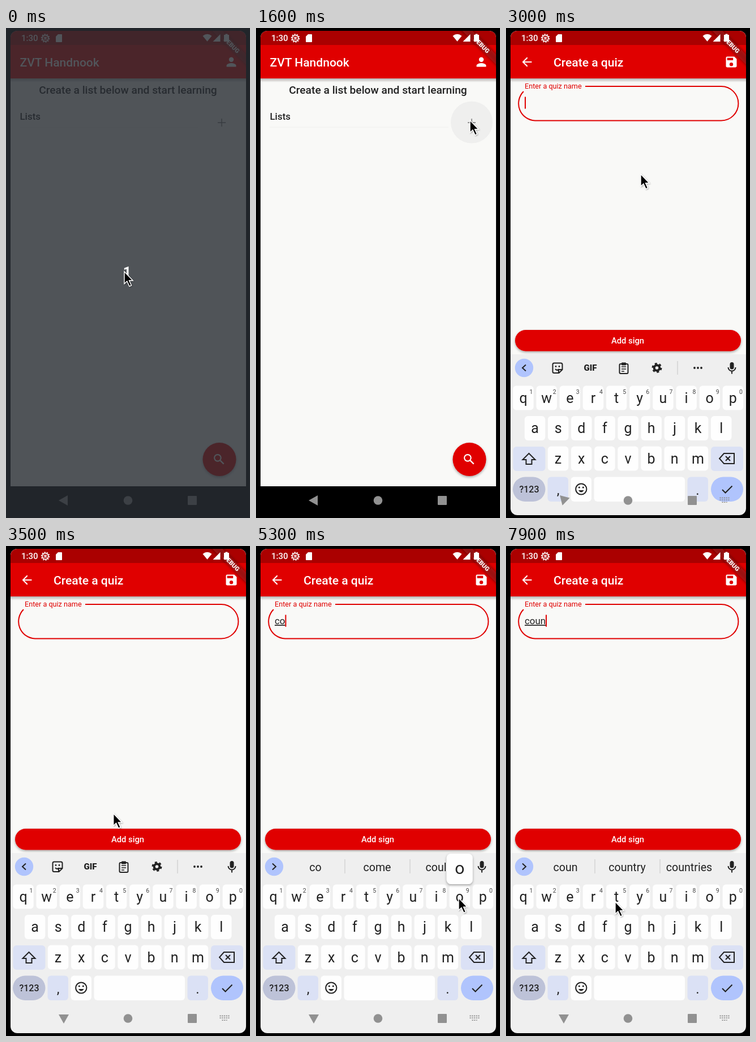
An HTML page that plays this animation: 431 by 865 pixels, repeating every 8000 ms.

```html
<!DOCTYPE html>
<html lang="en">
<head>
<meta charset="utf-8">
<title>Creating a quiz list</title>
<style>
  html, body { margin: 0; width: 100%; height: 100%; overflow: hidden; background: #000; }
  svg { display: block; width: 100vw; height: 100vh; font-family: Roboto, sans-serif; }
  .line { fill: none; stroke: #222; stroke-width: 2; }
  .mid { text-anchor: middle; }
</style>
</head>
<body>
<svg id="stage" viewBox="0 0 431 865"></svg>
<script>
const LOOP = 8000, STEP = 100, RED = '#e00000', GREY = '#919191', INK = '#212121';
const BLUE = '#b0c4fd', PALE = '#dbe1f5';

// ---------- drawing helpers ----------
const text = (x, y, size, content, attrs = '') =>
  `<text x="${x}" y="${y}" font-size="${size}" ${attrs}>${content}</text>`;
const box = (x, y, w, h, r, fill, attrs = '') =>
  `<rect x="${x}" y="${y}" width="${w}" height="${h}" rx="${r}" fill="${fill}" ${attrs}/>`;
const dot = (x, y, r, attrs = '') => `<circle cx="${x}" cy="${y}" r="${r}" ${attrs}/>`;
const path = (d, attrs = '') => `<path d="${d}" ${attrs}/>`;
const icon = (x, y, body) =>
  `<g transform="translate(${x} ${y}) scale(1.053) translate(-12 -12)" fill="#fff">${body}</g>`;

const personIcon = dot(12, 8, 4) + path('M12 14c-2.67 0-8 1.34-8 4v2h16v-2c0-2.66-5.33-4-8-4z');
const backIcon = path('M20 12H5.5M12.7 4.7L5.4 12l7.3 7.3', 'fill="none" stroke="#fff" stroke-width="2"');
const searchIcon = dot(9.5, 9.5, 5.5, 'fill="none" stroke="#fff" stroke-width="2"') +
  path('M14 14l5.7 5.7', 'stroke="#fff" stroke-width="2.2"');
const saveIcon = path('M17 3H5a2 2 0 0 0-2 2v14a2 2 0 0 0 2 2h14a2 2 0 0 0 2-2V7z') +
  `<g fill="${RED}">${dot(12, 16, 3)}${box(5, 5, 10, 4, 0, RED)}</g>`;

const page = (id, title, titleX, content) => `<g id="${id}">
  ${box(8, 5, 416, 804, 0, '#f9f9f7')}
  ${box(8, 89, 416, 7, 0, 'url(#barShadow)')}
  ${box(8, 5, 416, 25.5, 0, '#aa0000')}${box(8, 30, 416, 59, 0, RED)}
  ${text(titleX, 68, 21.06, title, 'fill="#fff" font-weight="500"')}${content}</g>`;

// ---------- screens ----------
const listPage = page('listPage', 'ZVT Handnook', 24.5,
  icon(398, 60, personIcon) +
  text(215.5, 116, 19.2, 'Create a list below and start learning', `class="mid" font-weight="500" fill="${INK}"`) +
  text(24.5, 162, 16.85, 'Lists', `font-weight="500" fill="${INK}"`) +
  box(24, 174.5, 316, 1, 0, '#f0f0ee') +
  dot(381, 166.5, 37, 'id="ripple" fill="#efefee"') +
  path('M374 167h14M381 160v14', 'stroke="#777" stroke-width="1.4"') +
  dot(377, 761.5, 29.5, `fill="${RED}" filter="url(#shadow)"`) + icon(376.5, 761.5, searchIcon));

const quizPage = page('quizPage', 'Create a quiz', 84,
  icon(37, 60, backIcon) + icon(398, 60, saveIcon) +
  box(21, 103, 389, 60.5, 30.2, 'none', 'id="idleField" stroke="#9b9b9a"') +
  path('M140 103H380.2a30.2 30.2 0 0 1 0 60.5H51.2A30.2 30.2 0 0 1 31 112',
    `id="activeField" fill="none" stroke="${RED}" stroke-width="2"`) +
  text(33, 107, 12.64, 'Enter a quiz name', 'id="label"') +
  text(33, 138, 16.85, '', `id="entry" fill="${INK}" text-decoration="underline"`) +
  box(0, 121.5, 2, 21, 0, RED, 'id="caret"') +
  `<g id="addButton">${box(16, 499, 399, 37.5, 18.7, RED, 'filter="url(#shadow)"')}
   ${text(215, 523, 14.74, 'Add sign', 'class="mid" fill="#fff" font-weight="500"')}</g>`);

// ---------- keyboard ----------
const keyCentres = {};
function keyRow(letters, firstX, y) {
  return [...letters].map((letter, i) => {
    const x = firstX + i * 41.15;
    keyCentres[letter] = [x, y];
    const digit = letters.length === 10 ? text(x + 14, y - 7.5, 10.5, (i + 1) % 10, 'class="mid" fill="#444"') : '';
    return box(x - 18.2, y - 21.5, 36.5, 43, 6, '#fefefe') + text(x, y + 8.5, 25, letter, 'class="mid"') + digit;
  }).join('');
}

const tools = `<g id="tools">
  <g class="line">${path('M85 557.5h12a2.500 2.500 0 0 1 2.500 2.500v9l-6 6h-8.500a2.500 2.500 0 0 1-2.500-2.500v-12.500a2.500 2.500 0 0 1 2.500-2.500zM93 575v-6h6M87 568q4 4 6 0')}
  ${box(200.500, 559, 15, 17, 2, 'none')}${path('M204 568h8M204 572h5M204 564h8', 'stroke-width="1.6"')}</g>
  ${box(204, 556.5, 8, 5, 1, '#222')}${dot(88, 563.5, 1.4)}${dot(94, 563.5, 1.4)}
  ${text(149, 571, 15, 'GIF', 'class="mid" font-weight="900"')}
  ${dot(266.500, 566, 4.8, 'class="line" style="stroke-width:4"')}
  ${dot(266.500, 566, 7.5, 'class="line" style="stroke-width:3" stroke-dasharray="3.93"')}
  ${box(302.5, 554, 1, 24, 0, '#c4c4c4')}
  ${[333, 339, 345].map(x => dot(x, 566, 1.9)).join('')}</g>`;

const suggestions = `<g id="suggestions">
  ${[105, 214, 323.5].map(x => text(x, 574, 19.6, '', 'class="mid word"')).join('')}
  ${box(156.5, 553, 1, 25, 0, '#c8c8c8')}${box(271.5, 553, 1, 25, 0, '#c8c8c8')}</g>`;

const micIcon = box(395.5, 556, 7, 12.5, 3.5, '#222') +
  path('M392.5 565a6.5 6.5 0 0 0 13 0M399 571.500v5', 'class="line"');

const keyboard = `<g clip-path="url(#deviceClip)"><g id="keyboard" fill="${INK}">
  ${box(8, 542, 416, 400, 0, '#efefef')}
  ${dot(32, 566, 16.2, `fill="${BLUE}"`)}${path('M4 -5.5L-2 0L4 5.5', 'id="chevron" class="line"')}
  ${tools}${suggestions}${micIcon}
  ${keyRow('qwertyuiop', 30.5, 619)}${keyRow('asdfghjkl', 51, 672.5)}${keyRow('zxcvbnm', 92, 726)}
  ${box(12.500, 705, 57, 43, 6, PALE)}${path('M40.500 717l-11 11h6v8h10v-8h6z', 'class="line"')}
  ${box(362, 705, 57, 43, 6, PALE)}
  ${path('M385 717h18v18h-18l-8-9zM388 722l8 8M396 722l-8 8', 'class="line"')}
  ${box(12, 758.500, 57.500, 43.500, 21.7, '#bdc2d8')}${text(41, 786, 16, '?123', 'class="mid" font-weight="500"')}
  ${box(73.500, 758.500, 36.500, 43.500, 6, PALE)}${text(92, 790, 24, ',', 'class="mid"')}
  ${box(114.500, 758.500, 36.500, 43.500, 6, '#fefefe')}${dot(132.800, 780, 9.6, 'class="line"')}
  ${dot(129.300, 777, 1.6)}${dot(136.300, 777, 1.6)}${path('M127.800 782q5 7 10 0z')}
  ${box(155.500, 758.500, 160.500, 43.500, 6, '#fefefe')}
  ${box(320.500, 758.500, 36.500, 43.500, 6, PALE)}${text(338.500, 790, 24, '.', 'class="mid"')}
  ${box(362, 758.500, 57, 43.500, 21.7, BLUE)}${path('M382 781l5.500 5.500l12-12', 'class="line"')}
  <g id="popup">${box(-23, -76, 46, 54, 8, '#fefefe', 'filter="url(#shadow)"')}${text(0, -40, 30, '', 'class="mid" id="popupLetter"')}</g>
</g></g>`;

// ---------- device furniture ----------
const ribbon = `<g clip-path="url(#screenClip)"><g transform="translate(398.700 30.300) rotate(45)">
  ${box(-50, -6.3, 100, 12.6, 0, 'rgba(0,0,0,.5)', 'filter="url(#soft)"')}
  ${box(-50, -6.3, 100, 12.6, 0, 'rgba(183,28,28,.63)')}
  ${text(0, 3.9, 10.75, 'DEBUG', 'class="mid" fill="#fff" font-weight="900"')}</g></g>`;

const statusBar = `<g fill="#fff">
  ${text(27, 23, 15, '1:30', 'font-weight="500"')}
  ${dot(69.500, 18, 5.4, 'fill="none" stroke="#fff" stroke-width="1.6"')}
  ${dot(69.500, 18, 7, 'fill="none" stroke="#fff" stroke-width="1.6" stroke-dasharray="2.2"')}
  ${path('M66.500 16.500h6M66.500 19.500h6M69.500 16v4', 'stroke="#fff" stroke-width="1.3"')}
  ${path('M92 11h6a1 1 0 0 1 1 1v12a1 1 0 0 1-1 1h-9a1 1 0 0 1-1-1v-9z')}
  ${path('M347.500 14q8-6.500 16 0l-8 9.800z')}${path('M378.500 11v13h-13z')}
  ${path('M385 12h2.500v-1.500h4v1.500h2.500v12h-9z')}</g>`;

const navBar = `<g fill="${GREY}">
  ${path('M-9 0L7 -9V9z', 'id="navBack"')}${dot(215.500, 834, 7.800)}${box(321, 826, 16, 16, 1, GREY)}
  ${path('M377.500 829.500h17M377.500 833.200h17M381.500 837.200h9',
    `id="navKeys" stroke="${GREY}" stroke-width="1.800" stroke-dasharray="2.200 1.500"`)}</g>`;

const pointer = path('M0 0V21.500L4.800 17L9 26L12.500 24.400L8.500 15.800H15z',
  'id="pointer" fill="#000" stroke="#fff" stroke-width="1.400" filter="url(#soft2)"');

document.getElementById('stage').innerHTML = `<defs>
  <linearGradient id="barShadow" x2="0" y2="1"><stop stop-color="#000" stop-opacity=".28"/><stop offset="1" stop-opacity="0"/></linearGradient>
  <filter id="shadow" x="-30%" y="-30%" width="160%" height="170%"><feDropShadow dx="0" dy="2" stdDeviation="2" flood-opacity=".35"/></filter>
  <filter id="soft" x="-20%" y="-100%" width="140%" height="300%"><feGaussianBlur stdDeviation="2.500"/></filter>
  <filter id="soft2" x="-30%" y="-30%" width="170%" height="170%"><feDropShadow dx="1" dy="1" stdDeviation=".8" flood-opacity=".35"/></filter>
  <clipPath id="screenClip"><path d="M8 809V17a12 12 0 0 1 12-12H412a12 12 0 0 1 12 12V809z"/></clipPath>
  <clipPath id="deviceClip"><path d="M8 300H424V848a12 12 0 0 1-12 12H20a12 12 0 0 1-12-12z"/></clipPath>
  </defs>
  ${box(0, 0, 431, 865, 0, '#000')}
  <g clip-path="url(#screenClip)">${listPage}${quizPage}</g>
  ${ribbon}${keyboard}${statusBar}${navBar}
  <g id="countdown">${box(0, 0, 431, 865, 0, '#292e34', 'opacity=".81"')}
  ${text(214, 440, 25, '1', 'class="mid" fill="#fff" font-weight="700"')}</g>${pointer}`;

// ---------- motion ----------
const $ = id => document.getElementById(id);
const words = document.querySelectorAll('.word');
const clamp = v => Math.min(1, Math.max(0, v));
const smooth = v => v * v * (3 - 2 * v);
const progress = (t, from, to) => clamp((t - from) / (to - from));
const mix = (a, b, p) => a + (b - a) * p;
const show = (id, visible) => $(id).setAttribute('visibility', visible ? 'visible' : 'hidden');
const set = (id, attrs) => Object.entries(attrs).forEach(([name, value]) => $(id).setAttribute(name, value));

function along(keys, t, ease = smooth) {
  const next = keys.findIndex(key => key[0] > t);
  if (next === 0) return keys[0].slice(1);
  if (next < 0) return keys[keys.length - 1].slice(1);
  const [a, b] = [keys[next - 1], keys[next]];
  const p = ease(progress(t, a[0], b[0]));
  return a.slice(1).map((v, i) => mix(v, b[i + 1], p));
}

const pointerKeys = [
  [400, 209, 430], [1300, 378, 163], [2000, 378, 163], [2300, 299, 131], [2900, 299, 131],
  [3000, 238, 258], [3100, 206, 375], [3200, 191, 455], [3400, 190, 465], [4400, 181, 723],
  [4600, 181, 723], [5200, 358, 621], [5400, 358, 622], [5800, 272, 622], [6000, 272, 622],
  [6200, 263, 690], [6700, 291, 734], [6900, 291, 734], [7300, 193, 628]
];
const keyboardDrop = [[2800, 318], [2900, 150], [3000, 34], [3100, 7], [3200, 0]];
const backTurn = [[2700, 0], [2800, -27], [2900, -53], [3000, -75], [3200, -90]];
const typing = [
  { at: 2700, value: '', offers: [] },
  { at: 4600, value: 'c', offers: ['can', 'come'] },
  { at: 5300, value: 'co', offers: ['come', 'could'] },
  { at: 6000, value: 'cou', offers: ['country', 'countries'] },
  { at: 6900, value: 'coun', offers: ['country', 'countries'] }
];

function draw(t) {
  show('countdown', t < 100);
  show('ripple', t >= 1600);

  const enter = progress(t, 1600, 1900), scale = mix(.85, 1, 1 - (1 - enter) ** 3);
  set('quizPage', {
    opacity: clamp(enter * 1.6),
    transform: `translate(216 407) scale(${scale}) translate(-216 -407)`
  });

  const focus = smooth(progress(t, 2500, 2800));
  set('idleField', { opacity: focus ? 0 : 1 });
  set('activeField', { opacity: focus });
  set('label', { y: mix(138, 107, focus), 'font-size': mix(16.85, 12.64, focus), fill: focus ? RED : '#6f6f6e' });

  const [drop] = along(keyboardDrop, t);
  set('keyboard', { transform: `translate(0 ${drop})` });
  set('addButton', { transform: `translate(0 ${Math.min(265.5, drop)})` });
  set('navBack', { transform: `translate(102 834) rotate(${along(backTurn, t, p => p)[0]})` });
  show('navKeys', t >= 2700);

  const typed = typing.filter(event => event.at <= t).pop();
  const value = typed ? typed.value : '';
  $('entry').textContent = value;
  const blinkOn = typed && Math.floor((t - typed.at + 100) / 500) % 2 === 0;
  show('caret', blinkOn);
  set('caret', { x: 33 + (value ? $('entry').getComputedTextLength() : 0) });

  show('tools', !value);
  show('suggestions', value);
  if (value) [value, ...typed.offers].forEach((word, i) => { words[i].textContent = word; });
  set('chevron', { transform: `translate(${value ? 33 : 31} 566) scale(${value ? -1 : 1} 1)` });

  const pressed = value && t < typed.at + 100;
  show('popup', pressed);
  if (pressed) {
    const letter = value.slice(-1);
    $('popupLetter').textContent = letter;
    set('popup', { transform: `translate(${keyCentres[letter]})` });
  }
  set('pointer', { transform: `translate(${along(pointerKeys, t)})` });
}

const start = performance.now();
function tick() {
  const time = (performance.now() - start) % LOOP;
  draw(Math.floor(time / STEP) * STEP);
  requestAnimationFrame(tick);
}
tick();
</script>
</body>
</html>
```
